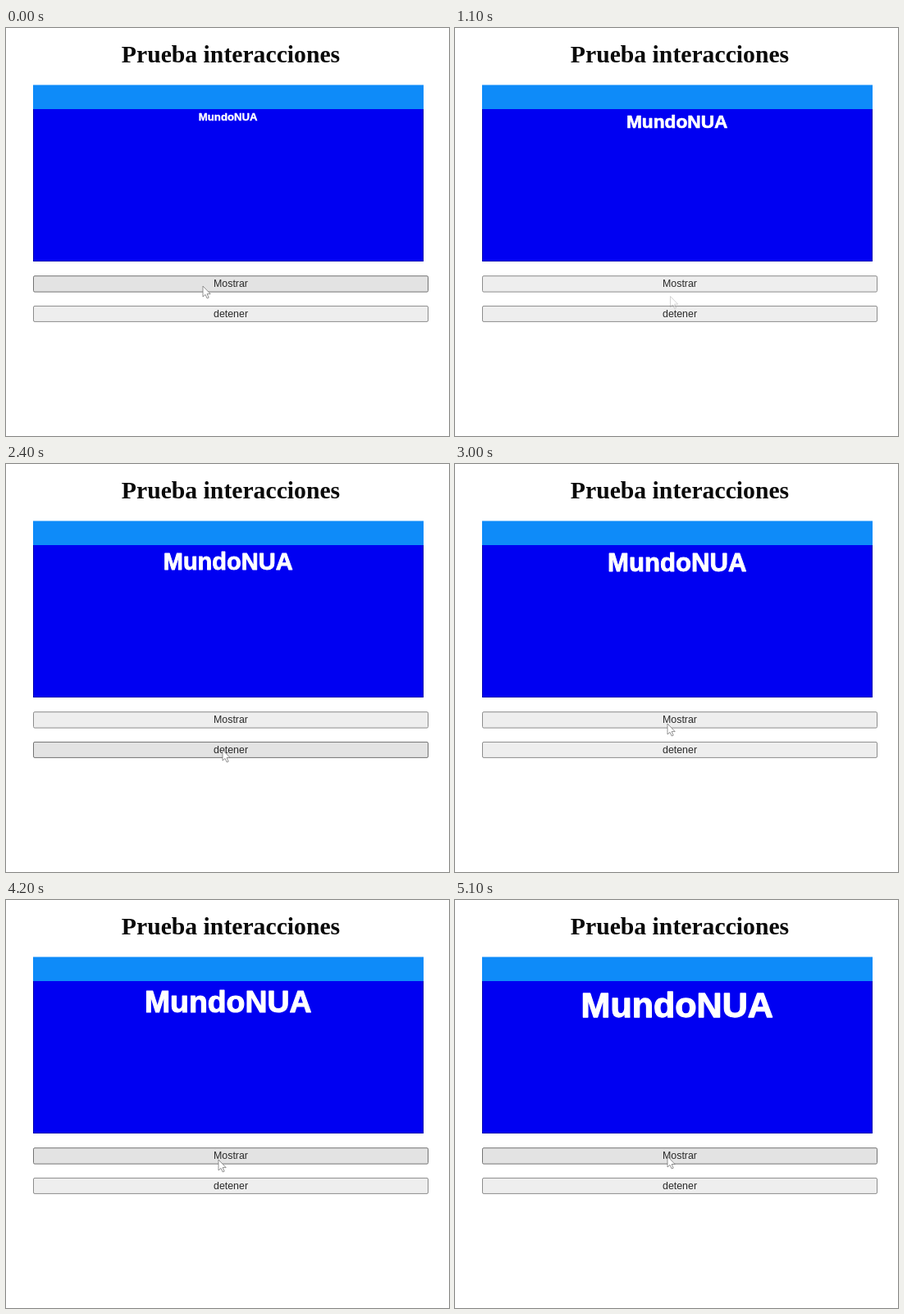
Write an HTML page that moves like this. It is 540 by 498 pixels and loops after 5200 ms.

```html
<!DOCTYPE html>
<html lang="es">
<head>
<meta charset="utf-8">
<title>Prueba interacciones</title>
<style>
  html, body { margin: 0; width: 100%; height: 100%; overflow: hidden; background: #fff; }
  svg { display: block; width: 540px; height: 498px; }
  text { text-anchor: middle; }
  .title { font: bold 29.7px "Liberation Serif", serif; fill: #0a0a0a; }
  .label { font: 12.4px "Liberation Sans", sans-serif; fill: #2a2a2a; }
  .word { font-family: "Liberation Sans", sans-serif; font-weight: bold; fill: #fff; stroke: #fff; stroke-linejoin: round; }
</style>
</head>
<body>
<svg viewBox="0 0 540 498">
  <rect width="540" height="498" fill="#fff"/>
  <text class="title" x="274" y="42.3">Prueba interacciones</text>
  <rect x="33" y="69.5" width="476" height="30" fill="#0e8bf9"/>
  <rect x="33" y="99" width="476" height="186" fill="#0000f2"/>
  <path d="M33.5 99V284.5H508.5V99" fill="none" stroke="#0000b0"/>
  <text class="word" id="word" x="270.7">MundoNUA</text>
  <rect id="show" x="33.5" y="302.7" width="481" height="19.4" rx="1.5"/>
  <text class="label" x="274" y="316">Mostrar</text>
  <rect id="stop" x="33.5" y="339.4" width="481" height="19" rx="1.5"/>
  <text class="label" x="274" y="353">detener</text>
  <path id="cursor" d="M0 0V13L3 10.4L5.2 15L7.2 14.1L5.1 9.6H9.2Z" fill="#fff" stroke="#777" stroke-width=".8"/>
</svg>
<script>
const LOOP = 5200, STEP = 100;
const el = id => document.getElementById(id);
const word = el("word"), show = el("show"), stop = el("stop"), cursor = el("cursor");

const ramp = (t, from, to) => Math.min(1, Math.max(0, (t - from) / (to - from)));
const ease = (t, from, to) => {
  const p = ramp(t, from, to);
  return p * p * (3 - 2 * p);
};

// The word grows in three runs, each halted by "detener".
const wordWidth = t =>
  72 + 52 * ramp(t, 0, 1000) + 46 * ramp(t, 1800, 2600) + 65 * ramp(t, 3200, 5100);

// The pointer visits the lower button twice, then rests on the upper one.
const pointer = t => {
  const back = ease(t, 2700, 3000);
  return {
    x: 240 + 24 * ease(t, 0, 1300) - 5 * back,
    y: 315 + 29 * ease(t, 0, 600) - 33 * ease(t, 800, 1400)
      + 38 * ease(t, 1900, 2300) - 32 * back - 4 * ease(t, 4500, 5100)
  };
};

function paint(button, hover) {
  button.setAttribute("fill", hover ? "#e3e3e3" : "#eeeeee");
  button.setAttribute("stroke", hover ? "#737373" : "#8c8c8c");
}

function draw(ms) {
  const t = Math.floor(ms % LOOP / STEP) * STEP;
  const w = wordWidth(t), { x, y } = pointer(t);
  const size = w / 5.46;
  const pressed = t >= 2900 && t < 3300;
  word.setAttribute("font-size", size);
  word.setAttribute("stroke-width", size * 0.03);
  word.setAttribute("y", 112.9 + (w - 72) * 0.184);
  paint(show, y < 323 && !pressed);
  paint(stop, y > 339 && y < 359);
  cursor.setAttribute("transform", `translate(${x} ${y})`);
  // Faint while it crosses the gap between the buttons.
  cursor.setAttribute("opacity", y > 323 && y < 338 ? 0.4 : 1);
}

const start = performance.now();
function tick() {
  draw(performance.now() - start);
  requestAnimationFrame(tick);
}
draw(0);
requestAnimationFrame(tick);
</script>
</body>
</html>
```
